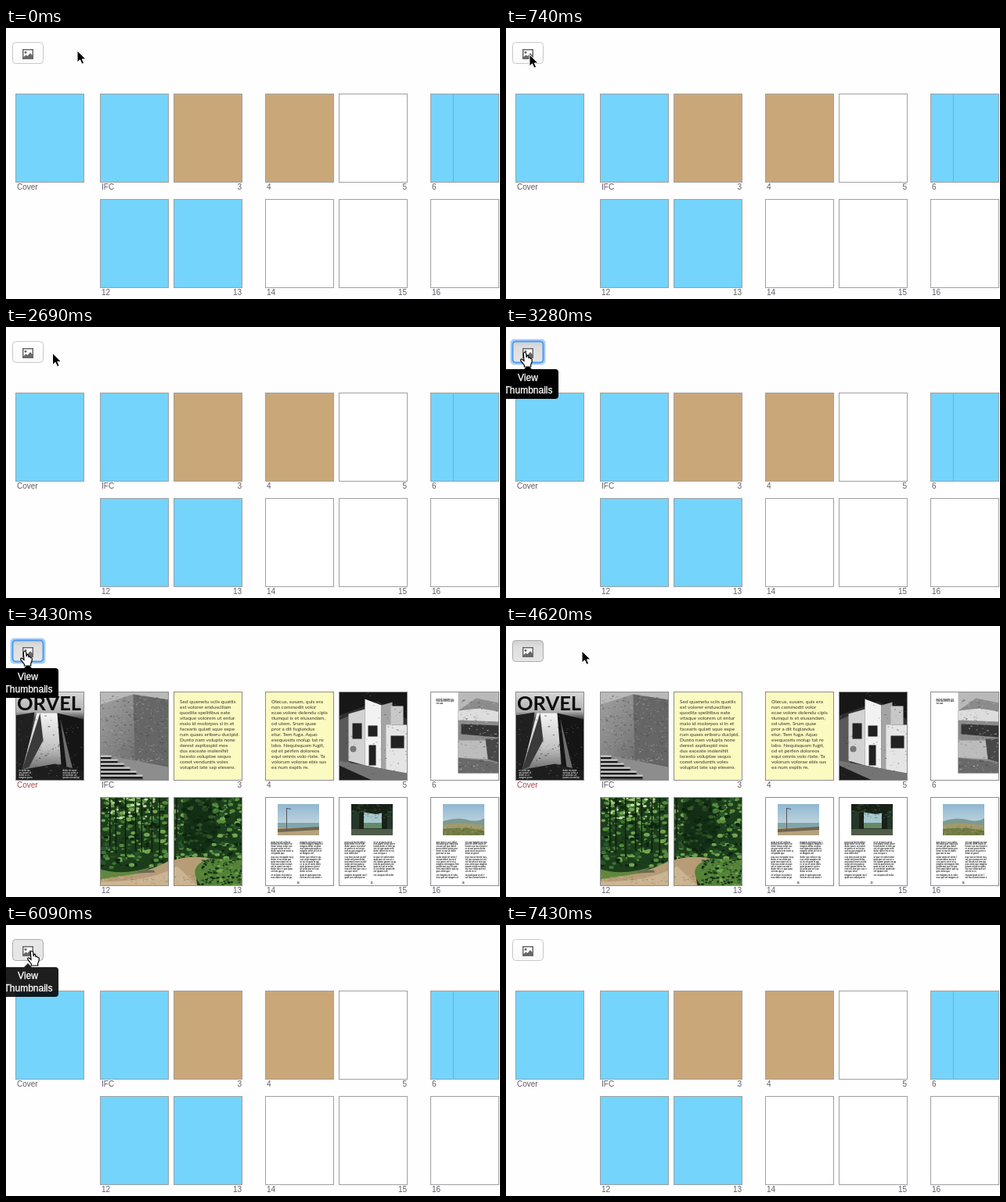
An HTML page that plays this animation: 631 px wide and 347 px high, repeating every 8100 ms.

```html
<!DOCTYPE html>
<html lang="en">
<head>
<meta charset="utf-8">
<title>Page planner thumbnails</title>
<style>
html, body { margin: 0; width: 100%; height: 100%; overflow: hidden; background: #fefefe; }
svg { display: block; width: 631px; height: 347px; }
.label { font: 300 10px "Liberation Sans", Arial, sans-serif; fill: #625a68; }
.tip { font: 12px "Liberation Sans", Arial, sans-serif; fill: #fff; stroke: #fff; stroke-width: .3; text-anchor: middle; }
.essay { font: 6.5px Lato, sans-serif; fill: #33332a; }
.tiny { font: bold 2.7px "Liberation Sans", Arial, sans-serif; fill: #222; }
.title { font: bold 25.5px Lato, sans-serif; fill: #0c0c0c; }
</style>
</head>
<body>
<svg id="stage" viewBox="0 0 631 347">
  <defs>
    <linearGradient id="rest" x2="0" y2="1"><stop stop-color="#fff"/><stop offset="1" stop-color="#fafafa"/></linearGradient>
    <linearGradient id="down" x2="0" y2="1"><stop stop-color="#cfcfcf"/><stop offset=".3" stop-color="#dedede"/><stop offset="1" stop-color="#e6e6e6"/></linearGradient>
    <linearGradient id="fog" x2="0" y2="1"><stop stop-color="#d8d8d8"/><stop offset=".22" stop-color="#b0b0b0"/><stop offset=".3" stop-color="#4c4c4c"/><stop offset="1" stop-color="#242424"/></linearGradient>
    <linearGradient id="tower" x2="0" y2="1"><stop stop-color="#f4f4f4"/><stop offset=".6" stop-color="#c4c4c4"/><stop offset="1" stop-color="#6d6d6d"/></linearGradient>
    <linearGradient id="wall" x2="1" y2="1"><stop stop-color="#a2a2a2"/><stop offset=".5" stop-color="#7c7c7c"/><stop offset="1" stop-color="#555"/></linearGradient>
    <linearGradient id="sky" x2="0" y2="1"><stop stop-color="#8fb7d2"/><stop offset="1" stop-color="#dbe5e4"/></linearGradient>
    <clipPath id="sheet"><rect width="87" height="113"/></clipPath>
    <clipPath id="photo"><rect width="53" height="40"/></clipPath>
  </defs>
  <g id="plain"></g>
  <g id="thumbs"></g>
  <g id="labels"></g>
  <g id="button">
    <rect id="ring" x="7.5" y="17.5" width="41" height="29" rx="3" fill="none" stroke="#a9cff8" stroke-width="4"/>
    <rect id="face" x="8.5" y="18.5" width="39" height="27" rx="4"/>
    <path d="M21 27h14v13H21z" fill="#686868"/>
    <path d="M22.5 28.5h11v6.5l-2.5-3-3.5 4-2-1.6-3 2.6z" fill="#fff"/>
    <circle cx="25" cy="31.2" r="1.5" fill="#686868"/>
  </g>
  <g id="tooltip">
    <path d="M-6 54H23L28 49L33 54H63q4 0 4 4V88q0 4-4 4H-6z" fill="#000"/>
    <text class="tip" x="28" y="69">View</text>
    <text class="tip" x="28.5" y="85">Thumbnails</text>
  </g>
  <path id="arrow" d="M0 0V15L3.6 11.8L6 17.2L8.6 16.1L6.3 10.9H11Z" fill="#000" stroke="#fff" stroke-width="1"/>
  <path id="hand" d="M-1.7 1Q-1.5-.5 0-.5Q1.6-.5 1.7 1L2.2 6Q4-.0 5 6.6Q6.8 5.4 7.3 7.6Q9.5 7 9.3 9.6Q9.3 13 7.7 15V18H-.6V16Q-3 13-5.3 9.9Q-5.6 7.7-3.4 8.2L-1 10.4Z" fill="#fff" stroke="#000" stroke-width="1.2"/>
</svg>
<script>
const $ = id => document.getElementById(id);
const LOOP = 8100, STEP = 148.6;
const TOP = 84.5, BOTTOM = 219.5;

let seed = 7;
const rnd = (a = 0, b = 1) => {
  seed = (seed * 16807) % 2147483647;
  return a + (b - a) * seed / 2147483647;
};
const pick = list => list[Math.floor(rnd(0, list.length))];
const rect = (x, y, w, h, fill) => `<rect x="${x}" y="${y}" width="${w}" height="${h}" fill="${fill}"/>`;
const path = (d, fill) => `<path d="${d}" fill="${fill}"/>`;
const text = (cls, x, y, s, extra = "") => `<text class="${cls}" x="${x}" y="${y}" ${extra}>${s}</text>`;
const many = (n, f) => Array.from({length: n}, (_, i) => f(i)).join("");
const frame = stroke => `<rect width="87" height="113" fill="none" stroke="${stroke}"/>`;
const page = (x, y, art, stroke) =>
  `<g transform="translate(${x + .5} ${y})"><g clip-path="url(#sheet)">${art}</g>${frame(stroke)}</g>`;

// Speckle scattered over a box, for rough surfaces
const grain = (n, x, y, w, h, tones, size) => many(n, () =>
  `<rect x="${rnd(x, x + w).toFixed(1)}" y="${rnd(y, y + h).toFixed(1)}" width="${rnd(.6, size).toFixed(1)}" height="${rnd(.5, size / 2).toFixed(1)}" fill="${pick(tones)}" opacity=".55"/>`);

const words = "lorem que volut est aut magnis dolor sit et ipsam nus re tem quia porro ut ea cus vel omni".split(" ");
const tinyLine = limit => {
  let s = pick(words);
  while (s.length < limit) s += " " + pick(words);
  return s.slice(0, limit);
};
const column = (x, y, n, limit) => many(n, i =>
  i % 8 == 6 ? "" : text("tiny", x, (y + i * 2.85).toFixed(2), tinyLine(i % 8 == 5 ? limit - 8 : limit)));

function cover() {
  return rect(0, 0, 87, 113, "url(#fog)")
    + path("M0 30L24 26L10 113H0Z", "#202020")
    + path("M27 27H53L62 92L8 100Z", "url(#tower)")
    + path("M31 27L35 62L17 96L8 100Z", "#3a3a3a")
    + path("M53 27L87 35V113H52L58 92Z", "#151515")
    + path("M57 35L74 104H66Z", "#6e6e6e")
    + path("M0 101L50 92L87 101V113H0Z", "#1d1d1d")
    + grain(110, 0, 30, 87, 80, ["#111", "#777", "#444"], 3)
    + text("title", 1.5, 23.5, "ORVEL")
    + many(4, i => text("tiny", 4, 101 + i * 3, tinyLine(12), 'style="fill:#ddd"'))
    + many(4, i => text("tiny", 60, 101 + i * 3, tinyLine(15), 'style="fill:#ddd"'));
}

function stairs() {
  const steps = many(6, i => rect(0, 81 + i * 5, 14 + i * 8, 2.4, "#c9c9c9") + rect(0, 83.4 + i * 5, 14 + i * 8, 2.6, "#191919"));
  return rect(0, 0, 87, 113, "url(#wall)")
    + path("M0 0H87V10L42 3L0 16Z", "#b9b9b9")
    + path("M42 3L87 10V95L44 85Z", "#666")
    + grain(520, 0, 4, 87, 88, ["#444", "#999", "#b0b0b0", "#5b5b5b"], 3)
    + path("M14 82L87 96V113H56Z", "#8d8d8d") + steps;
}

function villa() {
  return rect(0, 0, 87, 113, "#303030")
    + path("M0 0H87V35L50 12L0 30Z", "#171717")
    + path("M0 36L14 30V92H0Z", "#595959")
    + path("M12 28L33 22V94L12 88Z", "#d2d2d2")
    + path("M33 9L54 17V98L33 94Z", "#f2f2f2")
    + path("M54 17L68 13V102L54 98Z", "#a4a4a4")
    + path("M60 42H87V104H60Z", "#e5e5e5")
    + path("M66 18H82V42H66Z", "#c8c8c8")
    + path("M17 40H29V60H17ZM37 43H49V57H37ZM38 68H47V94H38ZM66 56H83V72H66Z", "#222")
    + `<circle cx="18" cy="73" r="4" fill="#777"/>`
    + path("M0 88L87 104V113H0Z", "#747474")
    + path("M0 94L42 113H0Z", "#1d1d1d")
    + grain(90, 0, 0, 87, 113, ["#222", "#888"], 2);
}

function bunker() {
  return rect(0, 0, 87, 113, "#fff")
    + many(3, i => text("tiny", 7, 10 + i * 2.8, tinyLine(i == 2 ? 8 : 17)))
    + rect(35, 0, 52, 104, "#b9b9b9")
    + path("M35 24L58 8L87 14V90L35 84Z", "#8b8b8b")
    + path("M35 24L62 21L87 25V38L35 36Z", "#ddd")
    + path("M39 41L87 43V58L39 54Z", "#353535")
    + path("M35 62H70L73 86L35 84Z", "#bcbcbc")
    + path("M70 60H87V90L73 86Z", "#484848")
    + path("M35 84L87 90V104H35Z", "#696969")
    + grain(190, 35, 10, 52, 93, ["#333", "#999", "#ccc"], 3);
}

// One wood scene, shared by two facing pages
function wood() {
  const greens = ["#173818", "#28552a", "#3f7735", "#548c3c", "#0d250f", "#72a64f"];
  const leaf = (x, y, r, c) => `<ellipse cx="${x.toFixed(1)}" cy="${y.toFixed(1)}" rx="${r.toFixed(1)}" ry="${(r * .65).toFixed(1)}" fill="${c}"/>`;
  return rect(0, 0, 182, 113, "#1c3d1b")
    + many(650, () => leaf(rnd(0, 182), rnd(0, 90), rnd(1, 4), pick(greens)))
    + many(60, () => leaf(rnd(2, 70), rnd(0, 28), rnd(1, 3), pick(["#9dc578", "#c9dfaf", "#69994b"])))
    + path("M105 0H140L150 48L130 75L108 62Z", "#0d260f99")
    + many(9, i => rect(8 + i * 11 + rnd(0, 5), 0, 1.4, rnd(50, 85), "#101b0d"))
    + path("M0 103Q48 100 78 86T140 78Q118 87 124 113H0Z", "#b69c77")
    + path("M0 108Q65 108 98 88L124 113H0Z", "#cbb492")
    + path("M0 92Q30 101 68 88L50 97L0 105Z", "#5f883d")
    + path("M140 78Q108 89 129 113H182V80Z", "#568237")
    + many(170, () => leaf(rnd(130, 182), rnd(79, 113), rnd(.8, 2.4), pick(greens)))
    + path("M46 94L68 93L70 96L49 97Z", "#6e6757")
    + grain(100, 0, 100, 120, 13, ["#8f7755", "#e0cba8"], 3);
}

function article(kind) {
  const scenes = [
    rect(0, 24, 53, 7, "#7fa5aa") + rect(0, 30, 53, 10, "#b4a17d") + path("M0 32L53 29V33L0 36Z", "#6d654e")
      + path("M11 5h1v30h-1zM12 5l5 1v1l-5-1z", "#555"),
    rect(0, 0, 53, 40, "#25362b") + path("M12 10H44V31H12Z", "#a7c9cf") + path("M12 24H44V31H12Z", "#658a68")
      + path("M0 0H53V8L32 13L0 8ZM10 5H16V40H10ZM39 5H46V40H39Z", "#182117") + path("M0 32H53V40H0Z", "#505b47")
      + grain(90, 0, 0, 53, 18, ["#4f7543", "#0e160f"], 3),
    path("M0 22Q18 16 31 20T53 18V40H0Z", "#7d9a91") + path("M0 27Q22 22 53 28V40H0Z", "#a39a6c")
      + path("M0 32Q26 28 53 34V40H0Z", "#727c46") + grain(60, 0, 28, 53, 12, ["#4d6033", "#bdab79"], 3)
  ];
  return rect(0, 0, 87, 113, "#fff")
    + `<g transform="translate(15.5 8.5)" clip-path="url(#photo)">${rect(0, 0, 53, 40, "url(#sky)")}${scenes[kind]}</g>`
    + column(7, 58, 17, 21) + column(44, 58, 17 - kind % 2, 21)
    + text("tiny", 40, 110, 14 + kind);
}

const essay = lines => rect(0, 0, 87, 113, "#fbfbc1")
  + lines.split("|").map((s, i) => text("essay", 7.5, (14.6 + i * 8.4).toFixed(1), s)).join("");

const left = "Sed quametu sciis quatiis|est volorer endusciliam|quodita spelitibus eate|vitaque volorem ut entur|maio id molorpos si in et|facearis quiati sque expe|rum quaes eriberu ducipid.|Dunto nam volupta none|derest aspitaspid mos|dus exceate molenihit|lacesto voluptae sequo|conet venduntis voles|voluptat late sap elesero.".split("|");
const right = "Olecus, susam, quis era|non commodit volor|ecae volore dolendu cipis|tiumqui is et eiusandam,|od utem. Srum quae|pror a dit fugiandus|etur. Tem fuga. Aquo|esequostis molup tat re|labo. Nequisquam fugit,|od et perfen doloreos|equi omnis volo riate. Ta|volorum volorae ebis sus|ea num explis re.".split("|");
const essayPage = lines => rect(0, 0, 87, 113, "#fbfbc1")
  + lines.map((s, i) => text("essay", 7.5, (14.4 + i * 7).toFixed(1), s)).join("");

const BLUE = "#74d4fb", TAN = "#caa779", WHITE = "#fff";
const scene = wood();
const pages = [
  [12, TOP, "Cover", 0, BLUE, cover()],
  [120, TOP, "IFC", 0, BLUE, stairs()],
  [214, TOP, "3", 1, TAN, essayPage(left)],
  [331, TOP, "4", 0, TAN, essayPage(right)],
  [425, TOP, "5", 1, WHITE, villa()],
  [542, TOP, "6", 0, BLUE, bunker()],
  [120, BOTTOM, "12", 0, BLUE, scene],
  [214, BOTTOM, "13", 1, BLUE, `<g transform="translate(-94 0)">${scene}</g>`],
  [331, BOTTOM, "14", 0, WHITE, article(0)],
  [425, BOTTOM, "15", 1, WHITE, article(1)],
  [542, BOTTOM, "16", 0, WHITE, article(2)]
];
for (const [x, y, name, atEnd, fill, art] of pages) {
  const fold = name == "6" ? rect(28.5, 0, 1, 113, "#82a9ba") : "";
  $("plain").innerHTML += page(x, y, rect(0, 0, 87, 113, fill) + fold, "#a0a0a0");
  $("thumbs").innerHTML += page(x, y, art, "#8c8c8c");
  $("labels").innerHTML += text("label", x + (atEnd ? 87 : 2), y + 122.5, name, atEnd ? 'text-anchor="end"' : "");
}
const coverLabel = $("labels").firstElementChild;

// Pointer stops: tick, x, y
const stops = [[0, 91, 29], [5, 30, 34], [10, 30, 34], [11, 49, 33], [13, 95, 34], [17, 95, 34], [19, 24, 33],
  [23, 24, 33], [28, 97, 32], [33, 97, 32], [38, 33, 34], [41, 33, 34], [45, 75, 35], [48, 75, 35], [49, 130, 53], [60, 130, 53]];
const fades = [[0, 0], [11, .34], [12, .12], [13, 0], [19, 1], [25, .6], [26, .2], [27, 0], [37, .5], [38, 1], [41, .88], [42, .5], [43, .12], [44, 0]];
const looks = [[0, "rest"], [11, "hover"], [13, "rest"], [19, "hover"], [21, "focus"], [25, "down"], [40, "focus"], [41, "hover"], [43, "rest"]];
const held = (list, k) => list.filter(e => e[0] <= k).pop()[1];

function pointer(k) {
  const i = stops.findIndex(s => s[0] > k);
  const a = stops[i - 1], b = stops[i];
  const u = (k - a[0]) / (b[0] - a[0]), e = u * u * (3 - 2 * u);
  return [a[1] + (b[1] - a[1]) * e, a[2] + (b[2] - a[2]) * e];
}

const show = (id, on) => $(id).style.display = on ? "" : "none";

function draw(t) {
  const k = Math.min(50, Math.floor((t + 8) / STEP));
  const [x, y] = pointer(k);
  const look = held(looks, k);
  const filled = k >= 23 && k < 41;
  show("plain", !filled);
  show("thumbs", filled);
  coverLabel.style.fill = filled ? "#a84a50" : "";
  show("ring", look == "focus");
  $("face").setAttribute("fill", look == "hover" ? "#e6e6e6" : look == "rest" ? "url(#rest)" : "url(#down)");
  $("face").setAttribute("stroke", look == "focus" ? "#4f9cef" : look == "rest" ? "#c8c8c8" : "#adadad");
  $("face").setAttribute("stroke-width", look == "focus" ? 2 : 1);
  $("tooltip").setAttribute("opacity", held(fades, k));
  const hand = k > 11 && x < 48;
  show("hand", hand && k < 50);
  show("arrow", !hand && k < 50);
  $(hand ? "hand" : "arrow").setAttribute("transform", `translate(${x.toFixed(1)} ${y.toFixed(1)})`);
}

const start = performance.now();
function tick() {
  draw((performance.now() - start) % LOOP);
  requestAnimationFrame(tick);
}
tick();
</script>
</body>
</html>
```
